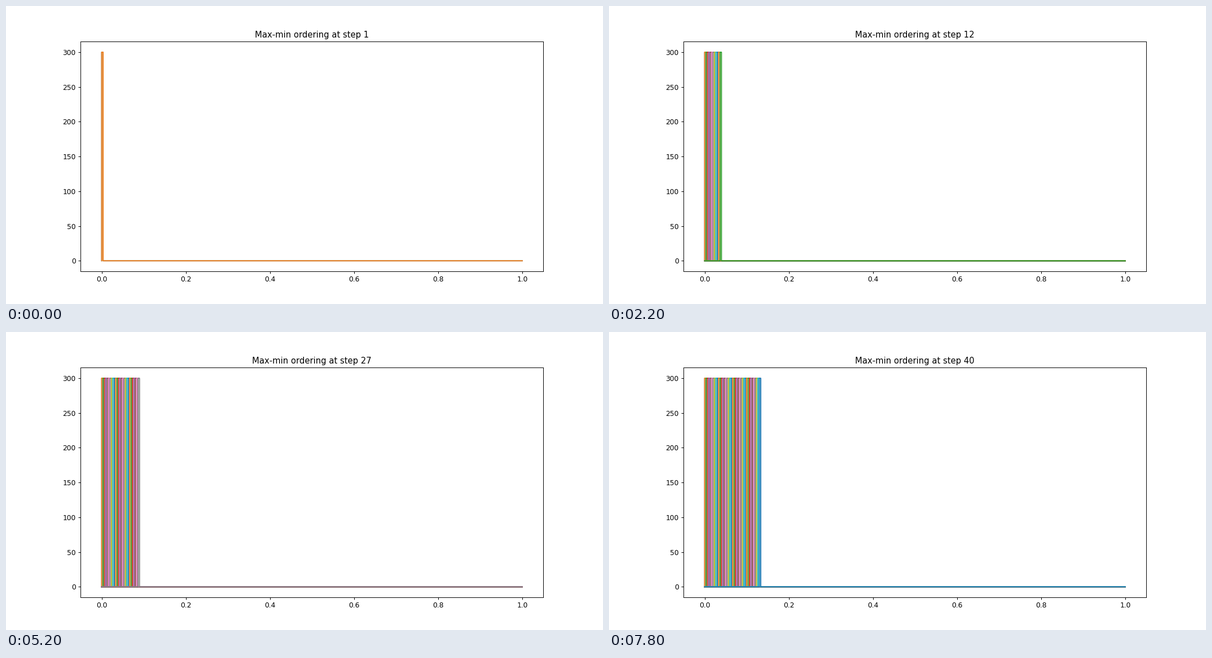
Animation, 1058 px wide and 529 px high, one loop 8000 ms. Source, as a matplotlib script:

```python
import matplotlib.pyplot as plt
from matplotlib.animation import FuncAnimation

STEPS = 40
CELLS = 300
INTERVAL = 200  # ms

plt.rcParams["font.family"] = "DejaVu Sans"

# 12 x 6 inches at 529/6 dpi gives 1058 x 529 pixels
fig, ax = plt.subplots(figsize=(12, 6), dpi=529 / 6)
title = ax.set_title("")


def add_pulse(step, color):
    """Density of one cell: zero everywhere, CELLS on the step's interval."""
    a, b = (step - 1) / CELLS, step / CELLS
    x = [0, a, a, b, b, 1]
    y = [0, 0, CELLS, CELLS, 0, 0]
    line, = ax.plot(x, y, color=color)
    line.set_snap(False)
    return line


# The first cell is drawn twice, so step k has the k-th cycle colour
add_pulse(1, "C0")
pulses = [add_pulse(k, f"C{k % 10}") for k in range(1, STEPS + 1)]
ax.set_xlim(-0.05, 1.05)
ax.set_ylim(-0.05 * CELLS, 1.05 * CELLS)


def update(i):
    for k, line in enumerate(pulses):
        line.set_visible(k <= i)
    title.set_text(f"Max-min ordering at step {i + 1}")
    return [title, *pulses]


anim = FuncAnimation(fig, update, frames=STEPS, interval=INTERVAL,
                     repeat=True, repeat_delay=0, blit=False)

plt.show()
```
